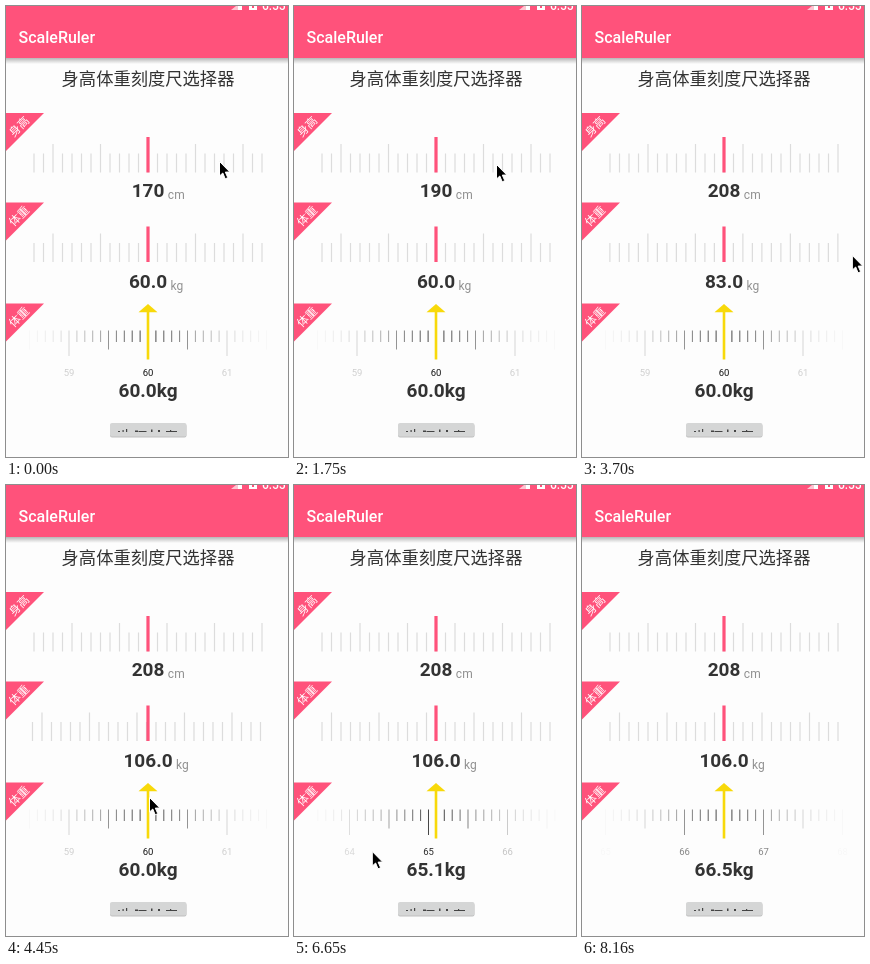
An HTML page with a canvas that plays this animation: 282x451 px, repeating every 8.57 s.

```html
<!DOCTYPE html>
<html lang="zh">
<head>
<meta charset="utf-8">
<style>
  html, body { margin: 0; width: 100%; height: 100%; overflow: hidden; background: #fdfdfd; }
  canvas { display: block; width: 282px; height: 451px; }
</style>
</head>
<body>
<canvas id="stage"></canvas>
<script>
const W = 282, H = 451, MID = 142, LOOP = 8570;
const PINK = '#ff527b', YELLOW = '#f8d90a', DARK = '#333';
const ROBOTO = 'Roboto, sans-serif', CJK = '"Noto Sans CJK SC", "Noto Sans CJK", sans-serif';

const canvas = document.getElementById('stage');
const ctx = canvas.getContext('2d');
const ratio = window.devicePixelRatio || 1;
canvas.width = W * ratio;
canvas.height = H * ratio;

const ease = {
  smooth: u => u * u * (3 - 2 * u),
  linear: u => u,
  drag: u => u * (0.4 + 0.6 * u),
  fling: u => 1 - (1 - u) ** 3
};

// Each key: [time, values, easing of the segment that ends here]
const heightKeys = [
  [110, [170]], [750, [180.6], 'drag'], [1600, [190], 'fling'], [1800, [190]],
  [2250, [200], 'drag'], [2690, [208], 'fling']
];
const weightKeys = [
  [2730, [60]], [3020, [64], 'drag'], [3250, [72.5], 'linear'], [3700, [83], 'fling'],
  [4080, [96], 'drag'], [4450, [106.16], 'fling'], [4600, [106], 'smooth']
];
const decimalKeys = [
  [4800, [60]], [5440, [62.04], 'drag'], [5900, [62.85], 'fling'], [6280, [62.85]],
  [6650, [65.09], 'drag'], [7500, [66.5], 'fling']
];
const cursorKeys = [
  [110, [213, 156]], [750, [112, 164], 'drag'], [950, [106, 165], 'fling'],
  [1750, [202, 159], 'smooth'], [1800, [202, 159]], [2250, [107, 168], 'drag'],
  [2690, [196, 240], 'smooth'], [2730, [196, 240]], [3020, [158, 242], 'drag'],
  [3250, [77, 246], 'linear'], [3700, [270, 250], 'smooth'], [4080, [146, 258], 'drag'],
  [4450, [143, 313], 'smooth'], [4800, [194, 335], 'smooth'], [5440, [33, 350], 'drag'],
  [6200, [235, 356], 'smooth'], [6280, [240, 357], 'linear'], [6650, [78, 367], 'drag'],
  [7050, [52, 369], 'fling'], [7930, [212, 432], 'smooth'], [8160, [219, 453], 'linear']
];

function sample(keys, t) {
  const next = keys.findIndex(key => key[0] > t);
  if (next < 0) return keys[keys.length - 1][1];
  if (next === 0) return keys[0][1];
  const [t0, from] = keys[next - 1];
  const [t1, to, kind = 'linear'] = keys[next];
  const u = ease[kind]((t - t0) / (t1 - t0));
  return from.map((v, i) => v + (to[i] - v) * u);
}

function rect(x, y, w, h, color) {
  ctx.fillStyle = color;
  ctx.fillRect(x, y, w, h);
}

function polygon(points, color) {
  ctx.beginPath();
  points.forEach(([x, y]) => ctx.lineTo(x, y));
  ctx.closePath();
  ctx.fillStyle = color;
  ctx.fill();
}

function text(str, x, y, font, color, align = 'center') {
  ctx.font = font;
  ctx.fillStyle = color;
  ctx.textAlign = align;
  ctx.fillText(str, x, y);
  return ctx.measureText(str).width;
}

function drawHeader() {
  const shadow = ctx.createLinearGradient(0, 52, 0, 58);
  shadow.addColorStop(0, 'rgba(0,0,0,.28)');
  shadow.addColorStop(1, 'rgba(0,0,0,0)');
  rect(0, 52, W, 6, shadow);
  rect(0, 0, W, 52, PINK);
  polygon([[225, 4], [230, 0], [232, 0], [232, 4]], '#ffc4d1');
  rect(232, 0, 4, 4, '#fff');
  rect(243, 0, 8, 4, '#fff');
  rect(246, 0, 2, 2, PINK);
  text('6:55', 256, 3.5, `500 12px ${ROBOTO}`, '#fff', 'left');
  text('ScaleRuler', 12.5, 37, `500 16px ${ROBOTO}`, '#fff', 'left');
  text('身高体重刻度尺选择器', MID, 78.5, `17.3px ${CJK}`, DARK);
}

function drawRibbon(label, y) {
  polygon([[0, y], [38, y], [0, y + 38]], PINK);
  ctx.save();
  ctx.translate(13, y + 13.5);
  ctx.rotate(-Math.PI / 4);
  text(label, 0, 4.2, `500 11.5px ${CJK}`, '#fff');
  ctx.restore();
}

function drawRuler(value, bottom, digits, unit, baseline) {
  const step = 9.5, reach = 118 / step;
  for (let n = Math.ceil(value - reach); n <= value + reach; n++) {
    const tall = n % 5 === 0 ? 28.5 : 19;
    rect(MID + (n - value) * step - 0.6, bottom - tall, 1.2, tall, '#dcdcdc');
  }
  rect(MID - 1.6, bottom - 35.5, 3.2, 35.5, PINK);
  const label = Math.round(value).toFixed(digits);
  const width = text(label, MID, baseline, `bold 19px ${ROBOTO}`, DARK);
  text(unit, MID + width / 2 + 3.5, baseline + 1.5, `12px ${ROBOTO}`, '#909090', 'left');
}

function drawDecimalRuler(value) {
  const step = 7.9, center = value * 10;
  for (let n = Math.ceil(center - 15.5); n <= center + 15.5; n++) {
    const offset = (n - center) * step;
    const x = MID + offset;
    const tall = n % 10 === 0 ? 25.5 : n % 5 === 0 ? 19 : 11.5;
    ctx.globalAlpha = (1 - Math.abs(offset) / 141) ** 2;
    rect(x - 0.5, 324.5, 1, tall, '#333');
    if (n % 10 === 0) text(n / 10, x, 370, `9.5px ${ROBOTO}`, '#111');
  }
  ctx.globalAlpha = 1;
  polygon([[MID, 298], [151.5, 306.3], [132.5, 306.3]], YELLOW);
  rect(MID - 1.3, 306, 2.6, 47.5, YELLOW);
  text(value.toFixed(1) + 'kg', MID, 391, `bold 19px ${ROBOTO}`, DARK);
}

function drawButton() {
  ctx.beginPath();
  ctx.roundRect(104, 418, 76.5, 13.5, 2);
  ctx.fillStyle = '#bfc0c0';
  ctx.fill();
  ctx.beginPath();
  ctx.roundRect(104, 417, 76.5, 13.5, 2);
  ctx.fillStyle = '#d5d6d6';
  ctx.fill();
  // Only a thin slice of the caption shows: x, width, height
  [[112, 2, 1], [116.5, 1.2, 2], [120, 1.2, 3], [129, 3, 1.5], [132.5, 8, 1],
   [145, 1.5, 2.5], [152, 2, 2], [160, 11, 1], [164, 1.2, 2]]
    .forEach(([x, w, h]) => rect(x, 426 - h, w, h, '#444'));
}

function drawCursor([x, y]) {
  ctx.save();
  ctx.translate(x, y);
  polygon([[0.5, -0.5], [0.5, 14], [3.8, 11], [6.2, 16.8], [8.8, 15.7], [6.3, 10.1], [10.8, 10]], '#000');
  ctx.strokeStyle = '#fff';
  ctx.lineWidth = 1;
  ctx.stroke();
  ctx.restore();
}

function draw(now) {
  const t = now % LOOP;
  ctx.setTransform(ratio, 0, 0, ratio, 0, 0);
  rect(0, 0, W, H, '#fdfdfd');
  drawHeader();
  drawRibbon('身高', 107);
  drawRibbon('体重', 196.5);
  drawRibbon('体重', 297.5);
  drawRuler(sample(heightKeys, t)[0], 166.5, 0, 'cm', 191);
  drawRuler(sample(weightKeys, t)[0], 256, 1, 'kg', 282);
  drawDecimalRuler(sample(decimalKeys, t)[0]);
  drawButton();
  drawCursor(sample(cursorKeys, t));
}

const start = performance.now();
function tick() {
  draw(performance.now() - start);
  requestAnimationFrame(tick);
}
tick();
</script>
</body>
</html>
```
